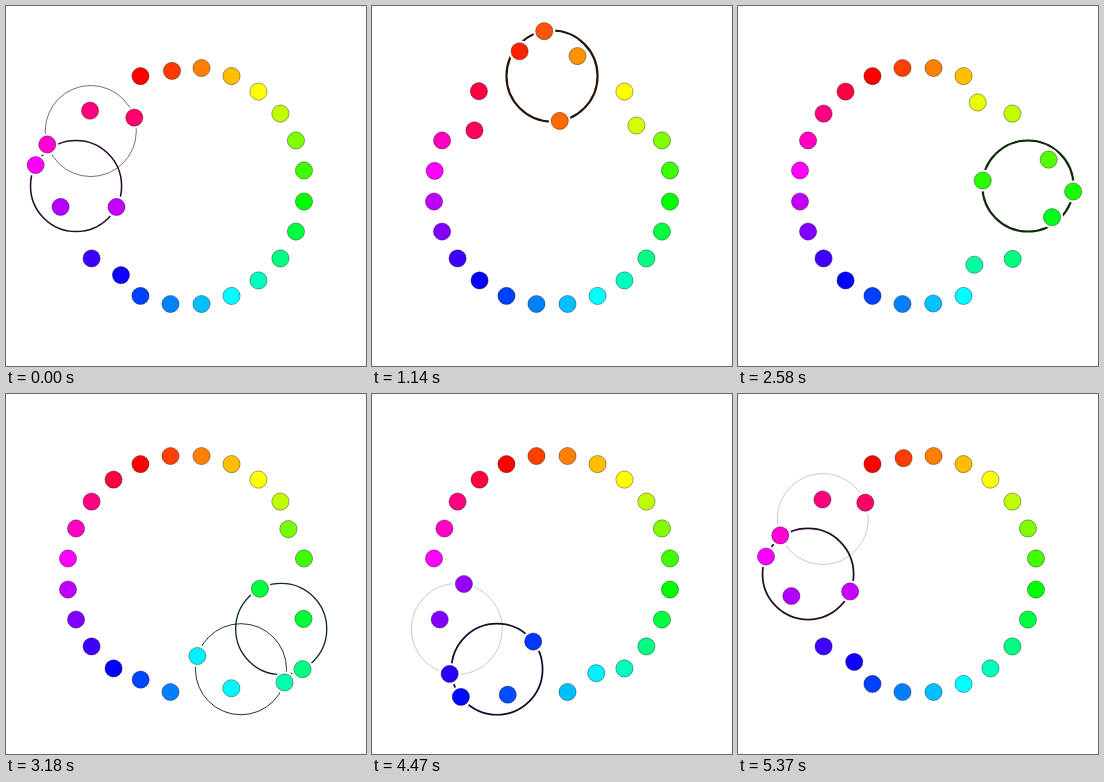
These frames come from a looping animation (360 px wide and 360 px high, 5400 ms). An HTML page with a canvas:

```html
<!DOCTYPE html>
<html>
<head>
<meta charset="utf-8">
<style>
html, body { margin: 0; width: 100%; height: 100%; overflow: hidden; background: #fff; }
canvas { display: block; }
</style>
</head>
<body>
<canvas id="stage" width="360" height="360"></canvas>
<script>
const ctx = document.getElementById('stage').getContext('2d');
const LOOP = 5400, STEP = 30, PAIRS = 12;
const RING = 119, SWAP = 1890, LEAD = 1102;
const RAD = Math.PI / 180;
const ORBIT = RING * Math.cos(22.5 * RAD);
const RADIUS = RING * Math.sin(22.5 * RAD);

const ease = u => u < 0.5 ? 2 * u * u : 1 - 2 * (1 - u) * (1 - u);

function disc(x, y, r, fill) {
  ctx.beginPath();
  ctx.arc(x, y, r, 0, 2 * Math.PI);
  ctx.fillStyle = fill;
  ctx.fill();
}

// Each pair of dots trades places by half a turn around its own circle.
function pairAt(k, t) {
  const out = 180 + 30 * k;
  const u = Math.min(1, ((t - k * LOOP / PAIRS + LEAD + LOOP) % LOOP) / SWAP);
  const p = ease(u);
  const x = 180 + ORBIT * Math.cos(out * RAD);
  const y = 180 + ORBIT * Math.sin(out * RAD);
  const a = (out + 90 + 180 * p) * RAD;
  const dx = RADIUS * Math.cos(a), dy = RADIUS * Math.sin(a);
  const hue = 270 + 30 * k;
  return {
    x, y, hue,
    line: 2.2 * (1 - ((u - 0.49) / 0.17) ** 2),
    dots: [
      { x: x + dx, y: y + dy, hue: hue + 45 * (1 - p) },
      { x: x - dx, y: y - dy, hue: hue + 45 * p }
    ]
  };
}

function draw(t) {
  ctx.fillStyle = '#fff';
  ctx.fillRect(0, 0, 360, 360);
  const pairs = Array.from({ length: PAIRS }, (_, k) => pairAt(k, t));
  const dots = pairs.flatMap(pair => pair.dots);

  for (const c of pairs) {
    if (c.line <= 0) continue;
    ctx.beginPath();
    ctx.arc(c.x, c.y, RADIUS, 0, 2 * Math.PI);
    ctx.lineWidth = c.line;
    ctx.strokeStyle = `hsl(${c.hue + 22.5}, 60%, 10%)`;
    ctx.stroke();
  }
  for (const d of dots) disc(d.x, d.y, 11, '#fff');
  for (const d of dots) {
    disc(d.x, d.y, 8.6, `hsl(${d.hue}, 100%, 50%)`);
    ctx.lineWidth = 0.8;
    ctx.strokeStyle = 'rgba(0, 0, 0, 0.45)';
    ctx.stroke();
  }
}

const start = performance.now();
function frame() {
  const t = Math.max(0, performance.now() - start) % LOOP;
  draw(Math.floor(t / STEP) * STEP);
  requestAnimationFrame(frame);
}
frame();
</script>
</body>
</html>
```
